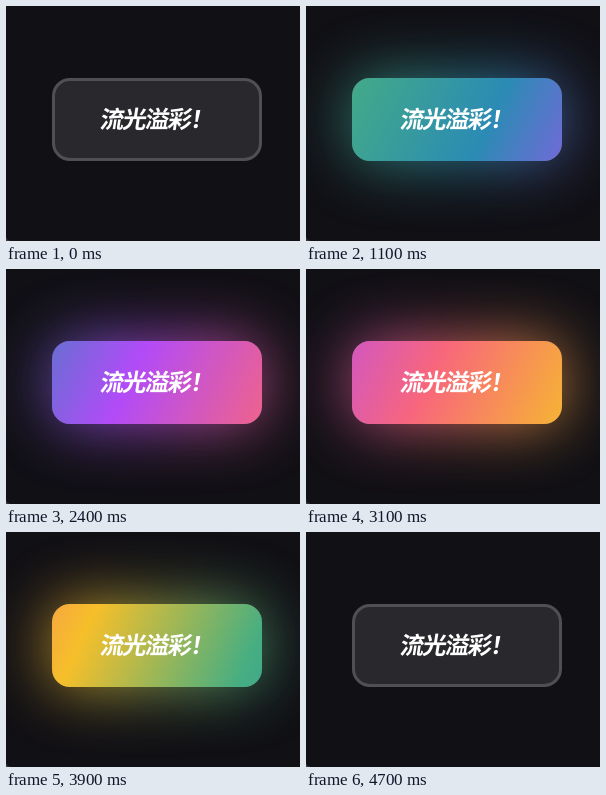
Animation, 294 px wide and 235 px high, one loop 4.9 s. Source, as an HTML page:

```html
<!DOCTYPE html>
<html lang="zh-CN">
<head>
<meta charset="utf-8">
<style>
  html, body { margin: 0; width: 100%; height: 100%; overflow: hidden; }
  html { background: #36363a; }
  body { position: relative; background: #111015; border-bottom-left-radius: 5px; }
  .box {
    position: absolute; left: 46px; top: 72px; width: 210px; height: 83px;
    box-sizing: border-box; border-radius: 18px;
  }
  .plain { background: #29282c; border: 3px solid #505053; }
  .glow { filter: blur(32px); }
  .label {
    display: flex; align-items: center; justify-content: center;
    padding-bottom: 5px; transform: skewX(-9deg);
    font: 700 24px "Noto Sans CJK SC", "Noto Sans CJK", sans-serif;
    letter-spacing: -1.4px; color: #fff; white-space: nowrap;
  }
</style>
</head>
<body>
<div class="box glow light"></div>
<div class="box plain"></div>
<div class="box light"></div>
<div class="box label">流光溢彩！</div>
<script>
const LOOP = 4900;
const START = 500;
const BAND = 160; // px between neighbouring colours
const colors = ['#46ae82', '#2b8bb4', '#b24bf8', '#f8667c', '#f6bf2a', '#46ae82'];
const lights = document.querySelectorAll('.light');

const ramp = (t, from, to) => {
  const k = Math.min(1, Math.max(0, (t - from) / (to - from)));
  return k * k * (3 - 2 * k);
};

function draw(now) {
  const t = now % LOOP;
  const shown = ramp(t, 450, 950) * (1 - ramp(t, 4030, 4500));
  // The bands gather speed from rest.
  const s = Math.max(0, t - START) / 1000;
  const shift = 2.13 * s * s / (s + 3) - 0.11;
  const stops = colors.map((c, i) => `${c} ${(i - shift) * BAND}px`);
  for (const el of lights) {
    el.style.background = `repeating-linear-gradient(115deg, ${stops})`;
    el.style.opacity = shown * (el.classList.contains('glow') ? 0.8 : 1);
  }
  requestAnimationFrame(draw);
}
requestAnimationFrame(draw);
</script>
</body>
</html>
```
